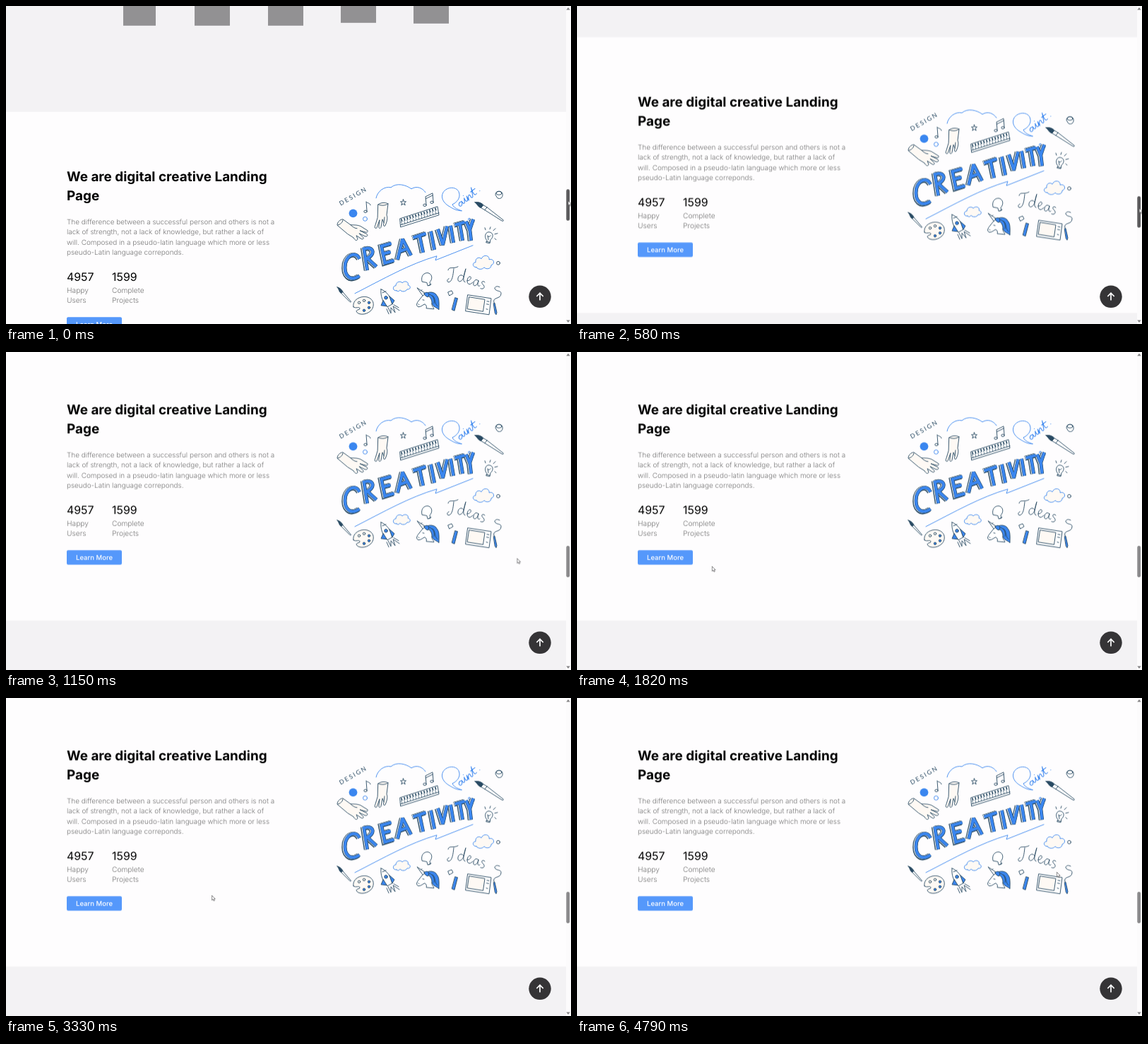
An HTML page that plays this animation: 800 by 450 pixels, repeating every 4.82 s.

```html
<!DOCTYPE html>
<html lang="en">
<head>
<meta charset="utf-8">
<title>Landing page</title>
<style>
html, body { margin: 0; width: 100%; height: 100%; overflow: hidden; background: #fefdfe; }
svg { display: block; width: 100vw; height: 100vh; }
text { font-family: Inter, "Open Sans", sans-serif; font-optical-sizing: none; text-rendering: geometricPrecision; }

.band { fill: #f3f2f4; }
.logo { fill: #929193; }
.title { font-size: 18.9px; font-weight: 700; }
.copy { font-size: 9.95px; font-weight: 300; fill: #777; }
.count { font-size: 15.9px; }
.label { font-size: 10.2px; }
.more { font-size: 9.5px; font-weight: 500; fill: #fff; }
.url { font: 5.9px "Open Sans", sans-serif; fill: #fff; }

.ink, .sky { fill: none; stroke-width: .9; stroke-linecap: round; stroke-linejoin: round; }
.ink { stroke: #294a63; }
.sky { stroke: #3a86ef; }
.cream { fill: #fef9f4; }
.white { fill: #fff; }
.blue { fill: #3a86ef; }
.navy { fill: #294a63; }
.letters { fill: none; stroke-linejoin: miter; stroke-miterlimit: 2; }
.design { font: 8.8px Lato, sans-serif; letter-spacing: 2px; fill: #294a63; }

/* one 4.82 s loop for every part */
.anim { animation: 4.82s linear infinite; }
#page { animation-name: scroll; }
#thumb { animation-name: drag, release; animation-timing-function: linear, step-end; animation-duration: 4.82s; animation-iteration-count: infinite; }
#mouse { animation-name: travel; }
#arrow { animation-name: arrow; animation-timing-function: step-end; }
#hand { animation-name: hand; animation-timing-function: step-end; }
#button { animation-name: hover; }
#status { animation-name: status; }

@keyframes scroll {
  0% { transform: translateY(160px); }
  7.47% { transform: translateY(88.5px); }
  17.63% { transform: translateY(12.5px); }
  22%, 100% { transform: translateY(0); }
}
@keyframes drag {
  0% { transform: translateY(-15px); }
  7.47% { transform: translateY(-8.3px); }
  17.63% { transform: translateY(-1.2px); }
  22%, 100% { transform: translateY(0); }
}
@keyframes release { 0% { fill: #5c5b5d; } 23.2%, 100% { fill: #8b8a8c; } }
@keyframes travel {
  0% { transform: translate(795.5px, 275px); }
  7.47% { transform: translate(795.5px, 282.5px); }
  17.63%, 23.2% { transform: translate(796px, 289.5px); }
  29% { transform: translate(176px, 308px); }
  34%, 37.76% { transform: translate(191px, 303px); }
  43.2% { transform: translate(150px, 290px); }
  52.9%, 59.1% { transform: translate(145px, 289px); }
  60.8% { transform: translate(166px, 288px); }
  69.1% { transform: translate(291px, 279px); }
  79.9% { transform: translate(395px, 272px); }
  90.5% { transform: translate(540px, 262px); }
  99.4%, 100% { transform: translate(679px, 246px); }
}
@keyframes arrow { 0% { opacity: 1; } 41.5% { opacity: 0; } 60.6%, 100% { opacity: 1; } }
@keyframes hand { 0% { opacity: 0; } 41.5% { opacity: 1; } 60.6%, 100% { opacity: 0; } }
@keyframes hover { 0%, 41.5% { fill: #5598fb; } 44.5%, 60.6% { fill: #6fa8fc; } 63.6%, 100% { fill: #5598fb; } }
@keyframes status { 0%, 46.4% { opacity: 0; } 47.5%, 65% { opacity: 1; } 68.5%, 100% { opacity: 0; } }
</style>
</head>
<body>
<svg viewBox="0 0 800 450" preserveAspectRatio="none">
  <defs>
    <g id="word">
      <path d="M500 198C495 188 484 191 480 204C477 222 487 231 500 222"/>
      <path d="M506 182L511 214M507 184C520 179 523 192 511 197L524 209"/>
      <path d="M545 176L531 180L536 204L549 200M533 191L544 188"/>
      <path d="M554 199L561 170L573 193M558 187L569 183"/>
      <path d="M576 168L594 162M585 165L590 189"/>
      <path d="M601 159L606 185"/>
      <path d="M611 156L618 178L624 152"/>
      <path d="M629 151L633 175"/>
      <path d="M635 150L649 146M642 148L646 172"/>
      <path d="M651 145L656 157L661 142M656 155L658 172"/>
    </g>
  </defs>

  <rect width="800" height="450" fill="#fefdfe"/>

  <g id="page" class="anim">
    <rect class="band" y="-500" width="793" height="490"/>
    <rect class="band" y="380" width="793" height="300"/>

    <g class="logo">
      <rect x="166" y="-178" width="46" height="46"/>
      <rect x="267" y="-182" width="50" height="50"/>
      <rect x="371" y="-182" width="50" height="50"/>
      <rect x="474" y="-186" width="50" height="50"/>
      <rect x="577" y="-185" width="50" height="50"/>
    </g>

    <text class="title"><tspan x="86" y="88.5">We are digital creative Landing</tspan><tspan x="86" y="115.3">Page</tspan></text>
    <text class="copy">
      <tspan x="86" y="149.5">The difference between a successful person and others is not a</tspan>
      <tspan x="86" y="163.6">lack of strength, not a lack of knowledge, but rather a lack of</tspan>
      <tspan x="86" y="177.8">will. Composed in a pseudo-latin language which more or less</tspan>
      <tspan x="86" y="191.9">pseudo-Latin language correponds.</tspan>
    </text>
    <text class="count" x="86" y="229.6">4957</text>
    <text class="count" x="150" y="229.6">1599</text>
    <text class="copy label"><tspan x="86" y="246">Happy</tspan><tspan x="86" y="260.2">Users</tspan></text>
    <text class="copy label"><tspan x="150" y="246">Complete</tspan><tspan x="150" y="260.2">Projects</tspan></text>
    <rect id="button" class="anim" x="86" y="280.5" width="78" height="20.5" rx="2"/>
    <text class="more" x="125" y="294.2" text-anchor="middle">Learn More</text>

    <!-- top row of doodles -->
    <text class="design" transform="translate(474 123) rotate(-30)">DESIGN</text>
    <circle class="blue" cx="491.5" cy="133.5" r="5.9"/>
    <circle class="sky" cx="508.5" cy="141.5" r="3"/>
    <path class="sky" d="M524 112C526 102 536 95 545 97C553 90 566 93 574 99C582 94 590 98 594 104"/>
    <g class="ink">
      <ellipse class="white" cx="509" cy="131" rx="2.2" ry="1.7"/>
      <path d="M511 130L510 117C512 120 515 118 516 122"/>
      <path d="M562.5 114L563.6 117H566.5L564.2 119L565.2 122L562.5 120.2L559.8 122L560.8 119L558.5 117H561.4Z"/>
      <path d="M595 121L594 110L604 105L605 117M594.3 113L604.3 108"/>
      <ellipse cx="593" cy="122" rx="2.2" ry="1.7"/><ellipse cx="603" cy="118" rx="2.2" ry="1.7"/>
      <path class="cream" d="M469 150C469 146 473 142 477 142L488 150C494 150 500 150 504 153L512 158C513 160 511 161 508 160L501 158L511 163C513 165 511 167 508 166L500 162L506 168C507 170 504 171 502 169L496 165L498 170C497 173 494 172 492 168L484 163Z"/>
      <path d="M470 150C473 150 477 146 477 143M488 150C491 153 494 155 497 155"/>
      <path class="cream" d="M527 121C531 118 537 118 541 120L539 136C541 141 539 146 537 151C535 153 534 151 535 147L533 142L531 153C530 156 527 155 528 151L529 143L525 154C523 156 521 154 523 150L526 140Z"/>
      <path d="M527 121C531 123 537 123 541 120M535 147L536 139"/>
    </g>
    <path class="ink white" d="M558 141L611 124L613 136L559 153Z"/>
    <path class="ink" d="M559 150L613 133" stroke-width=".7"/>
    <path d="M559.5 143.5L611 127" stroke="#294a63" stroke-width="4" stroke-dasharray="1.6 2.6" fill="none"/>
    <path d="M560 147.5L612 131" stroke="#294a63" stroke-width="5" stroke-dasharray=".6 3.6" fill="none"/>

    <path class="sky" d="M645 130C638 130 633 127 628 124C619 119 615 111 619 104C624 96 637 95 641 103C645 112 637 119 632 121C634 126 640 128 645 130Z"/>
    <path class="sky" transform="translate(643 125) rotate(-38) scale(1.13)" d="M6-4C3-7-1-3 1-1C3 1 6-3 6-5C6-2 6 0 8-1L11-6C10-2 10 0 13-1L15-6L14 0C16-5 19-7 19-4C18-1 19 1 21-1L26-11C23-3 23 1 27-1M22-7H29M32-1h.1M12-9h.1"/>
    <circle class="sky" cx="656" cy="142" r="1.5"/><circle class="sky" cx="662" cy="145" r="1"/>
    <g class="ink">
      <path class="navy" d="M664 118C669 117 674 119 676 122L673 126C668 125 668 121 664 118Z"/>
      <path class="white" d="M676 122L681 125L704 143C705 145 703 145 701 143.5L678 129L673 126Z"/>
      <path d="M681 125L678 129"/>
      <path class="white" d="M693 107C693 101 702 101 703 106C704 112 699 114 696 112Z"/>
      <ellipse cx="698" cy="105" rx="4" ry="2.5"/>
    </g>

    <!-- lettering -->
    <g class="letters">
      <use href="#word" x="-.8" y=".5" stroke="#294a63" stroke-width="6.8"/>
      <use href="#word" x="-.4" stroke="#fff" stroke-width="5"/>
      <use href="#word" x=".6" stroke="#294a63" stroke-width="5"/>
      <use href="#word" x=".5" stroke="#3a86ef" stroke-width="3.9"/>
    </g>
    <path class="sky" stroke-width="1.2" d="M494 247C535 226 572 205 610 194L608 200L661 179"/>

    <!-- right side -->
    <g class="ink">
      <path class="white" d="M681 172C677 168 678 161 683 160C690 160 691 167 686 171L685 176L680 175Z"/>
      <path d="M680 173.5L685 174.5M683 171L682 165L684 167L686 165M679 157L678 154M685 156L686 153M690 158L693 155M692 163L696 162M692 169L694 171"/>
    </g>
    <path class="sky cream" d="M666 210C660 210 660 203 665 203C664 196 671 195 673 198C676 191 685 193 684 199C691 197 693 205 687 207C687 213 679 213 677 210C674 214 668 213 666 210Z"/>
    <circle class="ink" cx="697" cy="204" r="2.4"/>
    <path class="ink" stroke-width="1.4" d="M626 214C627 208 633 213 640 209M634 212C633 221 632 230 627 231C624 231 624 227 627 226M648 223C644 218 639 223 640 228C641 232 646 230 648 224L651 212C648 222 646 230 650 231M653 229C658 229 660 224 657 223C653 223 651 233 656 234C658 234 660 232 661 231M669 229C665 225 661 230 662 235C664 238 668 234 669 229C667 235 668 238 671 236M678 231C675 228 672 231 675 234C679 237 677 242 672 240"/>

    <!-- bottom row -->
    <g class="ink">
      <path class="navy" d="M469 238C473 239 476 242 477 245L475 247C471 245 472 241 469 238Z"/>
      <path class="white" d="M477 245L488.5 258.5C488.5 259.5 487.5 259.5 486.5 258.5L475 247Z"/>
      <path class="cream" d="M492 266C490 256 502 250 511 252C522 255 522 265 517 271C509 279 497 277 496 272C497 269 501 271 501 268C500 265 495 269 492 266Z"/>
      <path class="white" d="M531 241C539 244 545 252 547 262L540 266C533 259 530 250 531 241Z"/>
      <circle class="blue" cx="538" cy="253" r="2.3"/>
      <path class="blue" d="M534 257L531 264L539 265ZM543 251L550 257L547 262Z"/>
      <path d="M533 246L538 244M541 267L545 275L545 267L551 274L548 265L557 271M539 269L542 276M549 263L556 267"/>
      <path class="white" d="M589 230C587 222 592 217 598 218C604 220 604 227 600 231L601 235L597 236L596 232Z"/>
      <path d="M598 236L602 234"/>
      <circle cx="500" cy="260" r="1.7"/><circle cx="507" cy="257" r="1.7"/>
    </g>
    <g class="ink blue">
      <circle cx="514" cy="260" r="1.7"/><circle cx="514" cy="267" r="1.7"/><circle cx="507" cy="271" r="1.7"/>
    </g>
    <path class="sky cream" d="M553 243C547 244 547 236 552 236C552 230 559 229 561 232C565 228 571 231 569 235C574 236 573 242 568 241C566 245 560 245 558 242C556 245 554 244 553 243Z"/>
    <g class="ink">
      <path class="blue" d="M593 248C599 243 608 245 610 250C614 254 613 262 613 270C609 266 605 267 603 261Z"/>
      <path class="white" d="M590 250L592 247C598 249 603 254 603 260C602 264 605 266 606 269L595 268C596 266 595 263 593 262C590 263 588 266 584 266C581 265 581 262 583 259Z"/>
      <path class="white" d="M590 250L582 239L594 247Z"/>
      <path class="blue" d="M592 247C597 243 600 247 598 252C595 252 593 250 592 247Z"/>
      <path d="M590 256L592 256.4M584 262L585 263M604 250C609 254 606 261 611 265M599 248C606 250 607 256 606 261M587 243L589 242"/>
      <path class="white" d="M626 245L631 243L633 247L628 250Z"/>
      <path class="blue" d="M636 253L639.5 254L635 271.5L631.5 270Z"/>
      <path class="white" d="M654 249L687 254L684 277L651 272Z"/>
      <path class="cream" d="M656 252L678 255.5L675.5 272.5L653.5 269Z"/>
      <path d="M681 258L684 258.5M680.5 262L683.5 262.5M680 269L682 269.5"/>
      <path class="blue" d="M690.5 261L692 260.5L695 274L694 277L692.5 275Z"/>
      <path d="M691 260C688 251 701 256 701 247C701 242 694 245 692 240C692 237 696 236 699 238"/>
    </g>
  </g>

  <!-- fixed browser parts -->
  <rect x="793" width="7" height="450" fill="#fcfbfc"/>
  <path d="M793.3 5.5L796 2L798.7 5.5ZM793.3 444.5L796 448L798.7 444.5Z" fill="#858486"/>
  <rect id="thumb" x="793.3" y="274.3" width="4.8" height="44.5" rx="2.4"/>
  <circle cx="756" cy="411.3" r="15.7" fill="#353436"/>
  <path d="M756 416.5V406.5M751.3 411L756 406.2L760.7 411" fill="none" stroke="#fff" stroke-width="1.7"/>
  <g id="status" class="anim">
    <path d="M0 439H117Q118.5 439 118.5 440.5V450H0Z" fill="#141415"/>
    <text class="url" x="2" y="446.4">localhost/Kucra_Landing_Page/index.php</text>
  </g>
  <g id="mouse" class="anim" stroke="#555457" stroke-width=".7" stroke-linejoin="round" fill="#fff">
    <path id="arrow" class="anim" d="M.4 .4V7.2L2 5.8L3.1 8.2L4.3 7.6L3.2 5.3H5.2Z"/>
    <path id="hand" class="anim" d="M1.2 5.2V1Q2 -.2 2.7 1V3.6L5.5 4.3Q6.2 4.6 6 5.6L5.3 9.5H2L0 6.4Q0 5 1.2 5.2Z"/>
  </g>
</svg>
</body>
</html>
```
